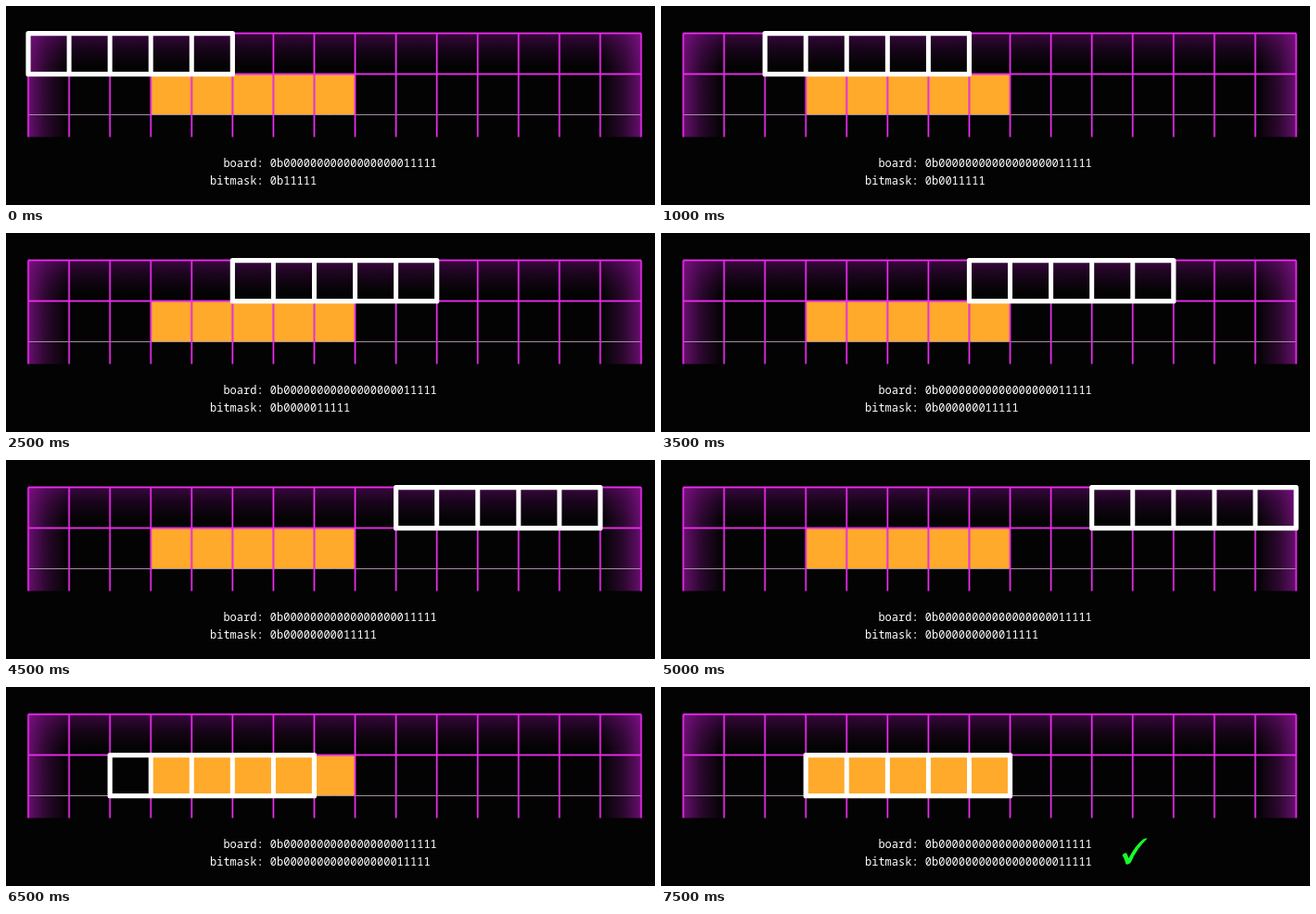
Animation, 700 px wide and 215 px high, one loop 9000 ms. Source, as an HTML page with a canvas:

```html
<!DOCTYPE html>
<html lang="en">
<head>
<meta charset="utf-8">
<title>Bitmask search on a board</title>
<style>
html, body { margin: 0; width: 700px; height: 215px; overflow: hidden; background: #020302; }
canvas, svg { position: absolute; left: 0; top: 0; display: block; }
text { font: 500 12px "Noto Sans Mono", "DejaVu Sans Mono", monospace; fill: #fff; white-space: pre; }
</style>
</head>
<body>
<canvas id="stage" width="700" height="215"></canvas>
<svg width="700" height="215">
  <text x="220" y="174">  board: 0b00000000000000000011111</text>
  <text id="mask" x="220" y="193"></text>
</svg>
<script>
const ctx = document.getElementById('stage').getContext('2d');
const mask = document.getElementById('mask');
const COLS = 15, CELL = 44.07, LEFT = 24, TOP = 29.5, ROW = 44, BOTTOM = 141.5;
const RIGHT = LEFT + COLS * CELL;
const STEP = 500, LOOP = 9000, LAST = 18;
const colX = c => LEFT + c * CELL;
const rowY = r => TOP + r * ROW;

function line(x1, y1, x2, y2, color, width) {
  ctx.strokeStyle = color;
  ctx.lineWidth = width;
  ctx.beginPath();
  ctx.moveTo(x1, y1);
  ctx.lineTo(x2, y2);
  ctx.stroke();
}

function glow(x1, y1, x2, y2, rgb, alpha) {
  const g = ctx.createLinearGradient(x1, y1, x2, y2);
  g.addColorStop(0, `rgba(${rgb},${alpha})`);
  g.addColorStop(0.45, `rgba(${rgb},${alpha * 0.42})`);
  g.addColorStop(1, `rgba(${rgb},0)`);
  ctx.fillStyle = g;
  ctx.fillRect(LEFT, TOP, RIGHT - LEFT, BOTTOM - TOP);
}

function neon(x1, y1, x2, y2) {
  line(x1, y1, x2, y2, 'rgba(200,20,210,0.3)', 3);
  line(x1, y1, x2, y2, '#e930ea', 1.4);
}

function drawBoard() {
  ctx.fillStyle = '#020302';
  ctx.fillRect(0, 0, 700, 215);
  glow(0, TOP, 0, TOP + 36, '110,10,120', 0.5);
  glow(LEFT, 0, LEFT + 42, 0, '150,20,160', 0.68);
  glow(RIGHT, 0, RIGHT - 42, 0, '150,20,160', 0.68);

  ctx.fillStyle = '#ffaa2b';
  ctx.fillRect(colX(3), rowY(1), 5 * CELL, ROW);

  line(LEFT, 117.5, RIGHT, 117.5, '#a68ca6', 1);
  for (let c = 0; c <= COLS; c++) neon(colX(c), TOP, colX(c), BOTTOM);
  for (let r = 0; r < 2; r++) neon(LEFT, rowY(r), RIGHT, rowY(r));
}

function drawFrame(col, row) {
  const x = colX(col), y = rowY(row) + 0.2;
  ctx.lineJoin = 'round';
  ctx.strokeStyle = '#fff';
  ctx.lineWidth = 5.2;
  ctx.strokeRect(x, y, 5 * CELL, ROW);
  for (let i = 1; i < 5; i++) line(x + i * CELL, y, x + i * CELL, y + ROW, '#fff', 5);
}

function drawCheck() {
  ctx.fillStyle = '#18fb2b';
  ctx.beginPath();
  ctx.moveTo(497.5, 181.5);
  ctx.quadraticCurveTo(501.5, 177.5, 503, 181);
  ctx.lineTo(504.3, 185);
  ctx.quadraticCurveTo(512, 170.5, 520, 164.5);
  ctx.quadraticCurveTo(522, 163.2, 524.8, 163.6);
  ctx.quadraticCurveTo(513.5, 174, 506.5, 190);
  ctx.quadraticCurveTo(504, 192, 501.5, 191.6);
  ctx.quadraticCurveTo(500, 185.5, 497.5, 181.5);
  ctx.fill();
}

let shown = -1;
function draw(step) {
  if (step === shown) return;
  shown = step;
  const pos = Math.min(step, 14);
  drawBoard();
  // The last position of the first row leaves no room past column 10.
  const row = pos > 10 ? 1 : 0;
  drawFrame(row ? pos - 11 : pos, row);
  const zeros = row ? pos + 4 : pos;
  mask.textContent = 'bitmask: 0b' + '0'.repeat(Math.min(zeros, LAST)) + '11111';
  if (step >= 15) drawCheck();
}

const start = performance.now();
function tick() {
  draw(Math.floor(((performance.now() - start) % LOOP) / STEP));
  requestAnimationFrame(tick);
}
draw(0);
requestAnimationFrame(tick);
</script>
</body>
</html>
```
